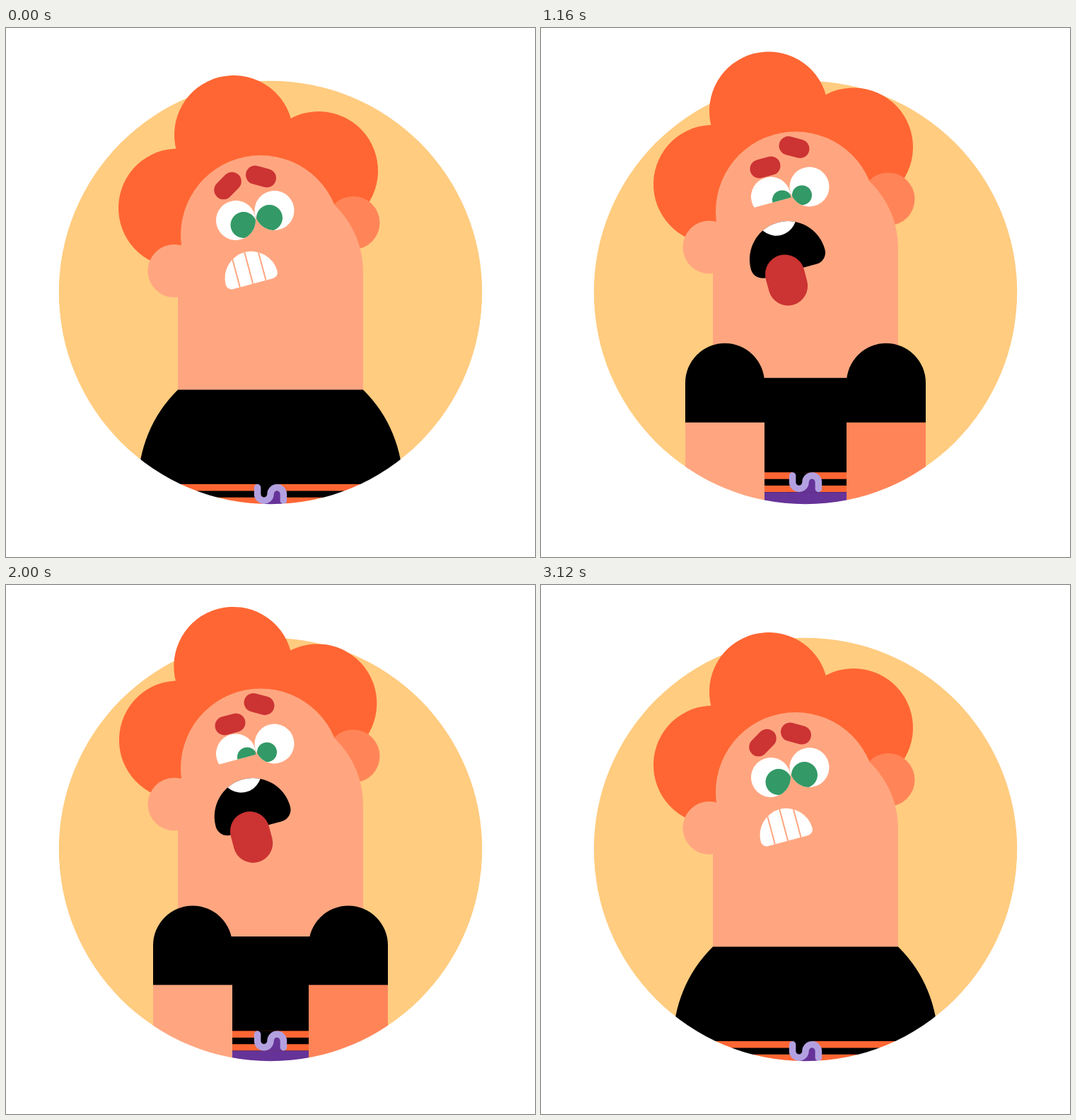
Write an HTML page with a canvas that moves like this. It is 748 px wide and 748 px high and loops after 3400 ms.

```html
<!DOCTYPE html>
<html lang="en">
<head>
<meta charset="utf-8">
<title>Queasy fellow</title>
<style>
  html, body { margin: 0; height: 100%; overflow: hidden; background: #fff; }
  canvas { display: block; }
</style>
</head>
<body>
<canvas id="stage" width="748" height="748"></canvas>
<script>
const c = document.getElementById('stage').getContext('2d');
const LOOP = 3400, STEP = 40, TILT = -Math.PI / 12, MID = 374, RADIUS = 299.3;
const SKIN = '#ffa680', SHADE = '#ff8559', HAIR = '#ff6633', RED = '#cc3333',
  GREEN = '#339966', LILAC = '#b3a0e0', PURPLE = '#663399', SAND = '#ffcc80';

const mix = (a, b, u) => a + (b - a) * u;
const span = (t, from, to) => Math.min(1, Math.max(0, (t - from) / (to - from)));
const bump = (t, from, to) => Math.sin(Math.PI * span(t, from, to));
const smooth = u => u * u * (3 - 2 * u);
const easeOut = u => 1 - (1 - u) ** 2;
const cubic = u => u < .5 ? 4 * u ** 3 : 1 - 4 * (1 - u) ** 3;

function pose(t) {
  const sick = smooth(span(t, 450, 600)) - smooth(span(t, 2000, 2140));
  const heave = easeOut(span(t, 560, 1240));
  const loll = 1 - (1 - heave) ** 1.4;
  const slump = cubic(span(t, 1880, 2240));
  const headRise = heave * (1 - cubic(span(t, 1960, 2240)));
  const bodyRise = heave * (1 - slump);
  const gulp = bump(t, 450, 620), land = bump(t, 2130, 2440);
  return {
    sick,
    squint: sick * (1 - smooth(span(t, 600, 800))),
    head: 6 * gulp - 34 * headRise + 3 * land,
    body: 5 * bump(t, 450, 700) - 17 * bodyRise + 2 * land,
    hair: 2.3 * gulp - .6 * bump(t, 1980, 2110) + land,
    half: 187 - sick * (17 + 27 * slump),
    sleeve: 445 + 57.5 * (1 - bodyRise) + 220 * (1 - sick),
    mouth: mix(37.7, 29.5 + 25 * heave, sick),
    lip: -33 - 9 * sick,
    jaw: mix(13, -4 + 33.5 * heave, sick),
    tongueR: sick * (17.5 + 10.4 * loll),
    tongueY: -11 + 51 * loll,
    tongueH: 8.7 * heave * heave,
    browL: mix(223, 233 - 2.5 * heave, sick),
    browR: mix(210, 208.5 - 6.5 * heave, sick),
    blink: t < 2960 || t >= 3120 ? 0 : t >= 3000 && t < 3080 ? 1 : .55
  };
}

function group(x, y, angle, paint) {
  c.save();
  c.translate(x, y);
  c.rotate(angle);
  paint();
  c.restore();
}

function fill(color, build) {
  c.fillStyle = color;
  c.beginPath();
  build();
  c.fill();
}

function clipTo(build) {
  c.beginPath();
  build();
  c.clip();
}

const disc = (color, x, y, r) => fill(color, () => c.arc(x, y, r, 0, 7));
const box = (color, x, y, w, h) => fill(color, () => c.rect(x, y, w, h));
const pill = (color, x, y, w, h) =>
  fill(color, () => c.roundRect(x - w / 2, y - h / 2, w, h, Math.min(w, h) / 2));

// Squashing lowers the top curl and spreads the side curls
function hair(k) {
  fill(HAIR, () => {
    c.moveTo(243, 254);
    c.lineTo(322, 151 + 9 * k);
    c.lineTo(442, 202);
    c.lineTo(361, 340);
  });
  const curl = (x, y, dx, dy) => group(x, y, TILT, () => disc(HAIR, dx * k, dy * k, 84));
  curl(322, 151, 0, 9.3);
  curl(243, 254.5, -4.7, 5);
  curl(442, 202, 4.7, 5);
}

function eye(x, y, top, bottom, lid, blink, pupil) {
  if (blink === 1) return;
  const upper = mix(-28, 3, blink), lower = mix(lid, 3, blink), h = bottom - top;
  group(x, y, TILT, () => {
    clipTo(() => c.rect(-30, upper, 60, lower - upper));
    clipTo(() => c.roundRect(-28, top, 56, h, h / 2));
    box('#fff', -30, -30, 60, 60);
    c.rotate(-TILT);
    disc(GREEN, pupil.x - x, pupil.y - y, pupil.r);
  });
}

function mouth(s) {
  const r = s.mouth, cy = s.lip + r, corner = s.jaw - cy, open = s.sick > .5;
  group(346, 349, TILT, () => {
    c.save();
    clipTo(() => {
      c.arc(0, cy, r, Math.PI, 0);
      c.arcTo(r, s.jaw, 0, s.jaw, corner);
      c.arcTo(-r, s.jaw, -r, cy, corner);
      c.closePath();
    });
    box(open ? '#000' : '#fff', -60, -60, 120, 120);
    if (open) disc('#fff', 0, -52, 28.4);
    else for (let i = -1; i <= 1; i++) box(SKIN, 19 * i - 1.2, -40, 2, 60);
    c.restore();
    if (open) pill(RED, -9.6, s.tongueY, 2 * s.tongueR, 2 * (s.tongueR + s.tongueH));
  });
}

function brow(x, y, degrees) {
  group(x, y, degrees * Math.PI / 180, () => pill(RED, 0, 0, 43.5, 26.5));
}

function face(s) {
  const p = s.sick, top = -28 + 9 * s.squint, r = mix(18.5, 14, p);
  eye(325, 272, top, -top, mix(28, 8.7, p), s.blink,
    { x: mix(336, 341, p), y: mix(278.5, 277, p), r });
  eye(379.5, 258, top, mix(28, 9, s.squint), 28, s.blink,
    { x: mix(372.5, 369, p), y: mix(268.5, 270, p), r });
  brow(mix(313.5, 317, p), s.browL, mix(-45, -15, p) - 5 * s.squint);
  brow(mix(360.5, 358, p) + 2 * s.squint, s.browR, 15);
  mouth(s);
}

function head(s) {
  hair(s.hair);
  disc(SHADE, 491, 275.5, 37.5);
  disc(SKIN, 360, 293, 113);
  fill(SKIN, () => c.roundRect(243, 214, 262, 340, [131, 131, 0, 0]));
  disc(SKIN, 238, 343.5, 37.5);
  face(s);
}

function drawstring() {
  const y = 659, r = 9.2, left = MID - r, right = MID + r;
  disc(PURPLE, right, y, r);
  box(PURPLE, left, y + 1, 27, 13);
  box('#000', left - r, y - 14, 28, 10);
  box('#000', left - r, y - 14, 2 * r, 14);
  disc('#000', left, y, r);
  c.strokeStyle = LILAC;
  c.lineWidth = 9.5;
  c.lineCap = 'round';
  c.beginPath();
  c.moveTo(left - r, y - r);
  c.arc(left, y, r, Math.PI, 0, true);
  c.arc(right, y, r, Math.PI, 0);
  c.lineTo(right + r, y + r);
  c.stroke();
}

function torso() {
  box('#000', 243, 511.5, 262, 200);
  box(HAIR, 243, 645, 262, 9.5);
  box(HAIR, 243, 663.7, 262, 9.3);
  box(PURPLE, 243, 673, 262, 60);
  drawstring();
}

function arm(color, x, top) {
  box(color, x, top + 111, 112, 300);
  fill('#000', () => c.roundRect(x, top, 112, 112, [56, 56, 0, 0]));
}

// White surround that trims the body to the lower half of the round backdrop
function trim() {
  fill('#fff', () => {
    c.arc(MID, MID, RADIUS, 0, Math.PI);
    c.lineTo(0, MID);
    c.lineTo(0, 748);
    c.lineTo(748, 748);
    c.lineTo(748, MID);
  });
}

function draw(t) {
  const s = pose(t);
  box('#fff', 0, 0, 748, 748);
  disc(SAND, MID, MID, RADIUS);
  disc('#000', MID, 645 + s.body, s.half);
  group(0, s.head, 0, () => head(s));
  group(0, s.body, 0, torso);
  arm(SKIN, MID - s.half, s.sleeve);
  arm(SHADE, MID + s.half - 112, s.sleeve);
  trim();
}

function tick(now) {
  draw(Math.floor(now % LOOP / STEP) * STEP);
  requestAnimationFrame(tick);
}
requestAnimationFrame(tick);
</script>
</body>
</html>
```
